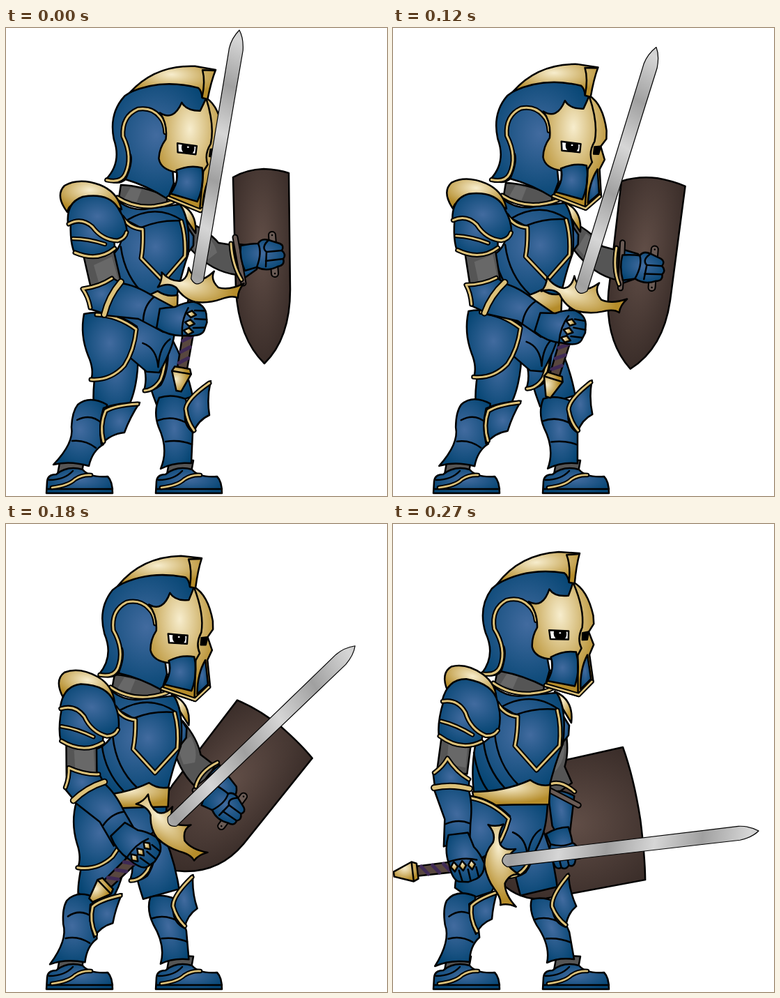
An HTML page that plays this animation: 547x671 px, repeating every 300 ms.

```html
<!DOCTYPE html>
<html lang="en">
<head>
<meta charset="utf-8">
<title>Knight lowering a sword</title>
<style>
html, body { margin: 0; width: 100%; height: 100%; overflow: hidden; background: #fff; }
svg { display: block; width: 100vw; height: 100vh; }
path { stroke: #000; stroke-width: 2.5; stroke-linejoin: round; stroke-linecap: round; vector-effect: non-scaling-stroke; }
.blue { fill: url(#blue); }
.gold { fill: url(#gold); }
.wood { fill: url(#wood); }
.steel { fill: url(#steel); stroke-width: 1.2; }
.gray { fill: #555; }
.grip { fill: #58473f; }
.white { fill: #fff; }
.black { fill: #000; }
.line { fill: none; }
.shade { fill: #686868; stroke: none; }
</style>
</head>
<body>
<svg id="stage" viewBox="0 0 547 671">
  <defs>
    <radialGradient id="blue" cx=".5" cy=".45" r=".6"><stop stop-color="#426b9f"/><stop offset="1" stop-color="#054573"/></radialGradient>
    <radialGradient id="gold" cx=".48" cy=".28" r=".62"><stop stop-color="#f7edcd"/><stop offset="1" stop-color="#b58c2a"/></radialGradient>
    <radialGradient id="wood" cx=".5" cy=".4" r=".6"><stop stop-color="#614e47"/><stop offset="1" stop-color="#3a2d29"/></radialGradient>
    <linearGradient id="steel" gradientUnits="userSpaceOnUse" x1="170" x2="235" y1="-8" y2="8" spreadMethod="reflect"><stop stop-color="#a0a0a0"/><stop offset="1" stop-color="#d6d6d6"/></linearGradient>
  </defs>
</svg>
<script>
const shape = (cls, d) => `<path class="${cls}" d="${d}"/>`;
const line = d => shape('line', d);
const stroke = (d, color, w) => `<path class="line" d="${d}" style="stroke:${color};stroke-width:${w}"/>`;
const band = (d, color, w) => stroke(d, '#000', w + 4) + stroke(d, color, w);
const trim = (d, w = 3) => band(d, '#dcc179', w);
const strap = (d, w) => band(d, '#6a5b55', w);
const diamond = x => shape('gold', `M${x - 5},0 l5,-7 5,7 -5,7z`);
const wrap = x => stroke(`M${x},-6 l9,12`, '#3f2a55', 5);

const foot = x => ({ art: `<g transform="translate(${x})">` +
  shape('gray', 'M78,618 L112,620 L108,642 L74,640Z') +
  shape('blue', 'M58,667 L59,650 Q60,640 72,640 Q88,627 110,633 Q120,645 146,643 Q153,650 153,667Z') +
  line('M59,661 L153,661') + line('M62,648 Q84,648 96,635') +
  trim('M66,659 Q90,656 99,647 Q110,640 122,641', 2.5) + '</g>' });

// A part swings between two poses, each given by an origin and one or two more landmarks.
// lag: follows the slower arm timing; bow: sideways bulge of its path;
// heldBy: hangs from another part's tip; drawn: landmarks of the artwork if not those of `from`.
const nearHip = { from: [150,415, 155,540], to: [132,400, 118,526] };

const forearm = { lag: true, from: [153,388, 264,423], to: [84,379, 100,490],
  art: shape('blue', 'M109,374 Q130,372 152,358 L166,366 L142,410 L121,403 Q119,385 109,374Z') +
    trim('M121,401 Q118,385 110,374 Q134,371 152,359') +
    shape('blue', 'M165,366 Q185,368 212,385 L240,400 Q228,415 226,436 L190,417 L142,412 Q150,385 165,366Z') +
    line('M212,386 Q198,398 197,419') +
    trim('M165,364 Q147,385 141,411', 6) };

const parts = [
  // shield and far arm
  { lag: true, bow: [4, -14], from: [326,214, 406,207, 371,480], to: [330,320, 363,510, 118,462],
    art: shape('wood', 'M326,214 Q345,203 370,202 Q392,203 406,208 L408,375 Q408,445 371,481 Q334,445 330,375Z') },
  { lag: true, from: [268,300, 322,335], to: [233,312, 233,377],
    art: shape('gray', 'M260,278 Q290,290 305,308 L330,312 L332,354 Q296,350 266,318Z') +
      shape('shade', 'M280,292 Q298,303 303,322 L290,332 L270,314Z') },
  { lag: true, bow: [11, -4], from: [323,310, 342,362, 360,330], to: [260,383, 220,383, 240,445],
    art: shape('blue', 'M326,309 L352,312 Q366,325 360,346 L343,358 Q331,340 326,309Z') +
      strap('M329,300 L341,366', 5) + trim('M323,309 Q325,340 338,361') },
  { lag: true, bow: [14, 6], from: [382,298, 386,351], to: [270,474, 222,484],
    art: strap('M382,297 L386,352', 8) + line('M382,297 h.1 M386,352 h.1') +
      shape('blue', 'M337,312 Q352,309 362,309 Q366,301 377,304 L393,309 Q400,312 396,319 Q403,325 398,331 Q401,340 390,342 Q375,350 360,343 L343,348 Q335,330 337,312Z') +
      line('M362,309 Q368,322 360,343') + line('M396,319 L374,321') + line('M398,331 L373,334') + line('M376,305 Q366,315 374,321 L373,342') },

  // far leg
  { from: [215,420, 245,530], to: [192,405, 212,520],
    art: shape('blue', 'M188,425 L235,440 Q258,480 268,528 L218,545 Q208,520 200,490Z') +
      shape('blue', 'M186,438 L232,440 Q236,490 222,512 Q210,522 198,520 Q204,500 196,480Z') +
      trim('M199,520 Q213,519 222,504 Q230,485 228,455') },
  foot(157),
  { from: [220,530, 222,632, 266,624], to: [199,538, 221,629, 260,624],
    art: shape('blue', 'M220,530 Q238,524 258,532 L268,580 L266,624 Q242,622 222,632 Q234,604 219,572 Q211,550 220,530Z') +
      line('M217,563 Q240,554 262,568') + line('M229,593 Q250,590 267,597') },
  { from: [294,506, 269,580], to: [252,501, 248,578],
    art: shape('blue', 'M257,552 Q258,530 294,506 Q288,530 292,555 Q276,562 269,580 Q255,570 257,552Z') +
      trim('M292,509 Q260,531 258,546 Q260,564 270,577') },

  // near leg
  foot(0),
  { ...nearHip, art: shape('blue', 'M130,480 Q124,520 126,540 L150,552 L178,538 Q194,500 188,436Z') },
  { from: [103,540, 68,625, 119,628], to: [77,540, 60,633, 110,628],
    art: shape('blue', 'M103,540 Q120,526 145,540 L140,597 Q124,606 119,628 Q92,620 68,626 Q98,595 94,572 Q95,550 103,540Z') +
      line('M102,562 Q122,552 138,567') + line('M95,592 Q114,590 129,602') },
  { from: [192,537, 137,597], to: [150,526, 119,588],
    art: shape('blue', 'M140,545 Q160,537 192,537 Q178,558 170,580 Q150,582 137,597 Q132,570 140,545Z') +
      trim('M189,539 Q156,541 143,549 Q134,570 140,593') },

  // torso
  { from: [170,274, 226,364], to: [153,260, 206,354], drawn: [153,260, 206,354],
    art: shape('gold', 'M232,240 Q260,252 256,285 L242,262Z') +
      shape('blue', 'M240,268 L253,289 L252,303 L240,318Z') +
      shape('blue', 'M114,396 L222,398 Q221,430 214,448 Q206,468 194,486 L176,484 L150,460 L110,440Z') +
      line('M172,442 Q192,450 193,478 Q196,448 212,438') +
      shape('blue', 'M146,234 Q165,250 190,246 L235,242 Q250,265 244,315 Q232,345 224,378 L116,386 Q112,350 118,318 Q150,310 150,270Z') +
      line('M116,328 Q122,364 136,382') + line('M130,312 Q134,350 160,378') + line('M146,300 Q150,345 180,374') +
      line('M156,262 Q200,238 238,266') +
      shape('blue', 'M153,260 Q165,272 178,273 Q205,263 236,266 Q242,290 240,318 L206,354 L174,318 Q180,295 177,274Z') +
      trim('M150,257 Q160,274 179,276 Q179,300 175,318 L206,353 L239,318 Q242,290 236,267') +
      shape('gold', 'M114,384 Q160,384 197,367 Q210,377 226,374 L224,402 Q170,402 118,404Z') +
      shape('gray', 'M150,210 Q180,212 217,230 L216,242 Q180,246 146,230Z') +
      shape('shade', 'M164,214 L180,218 L172,236 L154,230Z') +
      trim('M144,228 Q168,245 198,243 Q220,241 230,235') },
  { ...nearHip,
    art: shape('blue', 'M112,410 Q150,402 188,428 Q187,470 165,492 Q145,506 122,505 Q127,490 118,470 Q106,440 112,410Z') +
      trim('M122,504 Q150,506 170,484 Q184,462 187,432 Q160,412 130,411') },

  // head
  { from: [301,60, 279,265], to: [268,42, 267,248], drawn: [282,49, 268,256],
    art: shape('blue', 'M130,213 Q152,188 139,155 Q130,118 152,92 Q190,62 262,76 L270,92 L262,112 L220,150 L228,215 L220,238 Q190,220 158,212 Q148,222 130,213Z') +
      trim('M131,214 Q151,218 157,205 Q168,180 152,150 Q149,121 172,110 Q192,106 204,120 Q212,128 213,142') +
      line('M158,212 Q168,188 164,176') +
      shape('gold', 'M204,114 Q224,126 235,98 Q242,110 262,109 Q266,100 270,90 Q290,102 296,140 L296,152 L288,163 L294,182 L287,196 L290,234 L268,255 L220,238 L232,212 L232,199 Q208,196 205,180 Q205,165 214,152 Q216,130 204,114Z') +
      shape('blue', 'M231,196 Q250,187 268,191 Q273,215 263,240 L224,230 Q236,212 231,196Z') +
      shape('blue', 'M284,196 L287,231 L271,245 Q272,215 284,196Z') +
      line('M270,91 Q284,130 279,156 Q270,172 276,186 L270,196 L267,250') +
      shape('white', 'M231,157 L259,160 L258,172 L232,170Z') +
      shape('black', 'M239,159 L254,160 Q256,167 251,171 L242,170 Q237,166 239,159Z') +
      stroke('M246,162 l1,0', '#fff', 2) +
      shape('black', 'M279,164 L288,163 L285,174 L278,174Z') +
      trim('M221,236 L268,253 L288,235', 2.5) +
      shape('gold', 'M160,86 Q195,45 252,45 L282,49 Q276,66 272,92 L264,90 Q263,80 258,76 Q205,64 160,86Z') +
      line('M264,89 Q268,66 263,50 L281,50') },

  // near arm
  { from: [86,262, 166,258], to: [77,237, 149,252],
    art: shape('gold', 'M88,264 Q70,240 84,226 Q105,214 135,225 Q160,235 166,260 Q140,250 105,250 Q90,252 88,264Z') },
  { from: [132,326, 142,370], to: [90,304, 84,348],
    art: shape('gray', 'M108,312 L152,308 L167,372 L124,382Z') +
      shape('shade', 'M126,340 L152,328 L162,364 L134,368Z') },
  { from: [99,322, 156,316], to: [67,304, 127,312],
    art: shape('blue', 'M94,262 Q90,302 98,322 Q130,335 156,317 L154,270Z') +
      trim('M96,302 Q118,302 142,310', 2.5) + trim('M99,322 Q132,336 156,316') },
  { from: [89,282, 173,297], to: [70,255, 149,300],
    art: shape('blue', 'M89,281 Q86,250 110,242 Q150,235 163,262 Q172,275 174,293 Q172,306 160,306 Q135,302 124,286 Q108,272 89,281Z') +
      trim('M90,281 Q108,271 124,285 Q138,304 160,305 Q171,302 173,293') },
  forearm,

  // sword and hand, drawn along the x axis from the pommel
  { lag: true, heldBy: forearm, from: [264,423, 335,3], to: [100,490, 525,440], drawn: [99,0, 525,0],
    art: shape('grip', 'M32,-7 L136,-8 L136,8 L32,7Z') + [40, 56, 72, 116].map(wrap).join('') +
      shape('gold', 'M0,-3 L27,-14 L34,-11 L34,11 L27,14 L0,4Z') + line('M27,-13 L27,13') +
      shape('gold', 'M164,-52 Q152,-49 142,-54 Q152,-40 146,-28 Q132,-15 130,2 Q131,22 140,38 Q149,53 146,62 Q156,60 168,67 Q154,48 156,32 Q165,18 178,22 Q165,12 162,3 Q165,-8 177,-15 Q160,-14 156,-24 Q153,-38 164,-52Z') +
      shape('steel', 'M162,-9 Q150,0 162,9 L497,10 Q515,8 525,0 Q512,-9 497,-10Z') +
      shape('blue', 'M84,-46 Q75,-25 80,-4 Q82,20 92,22 L104,24 L116,21 Q129,16 130,0 Q126,-15 118,-25 Q114,-40 112,-46Z') +
      line('M93,6 L96,22 M106,6 L108,23 M118,4 L120,19 M80,-8 Q102,-13 120,-6') +
      [87, 99, 112].map(diamond).join('') }
];

const stage = document.getElementById('stage');
const mix = (a, b, f) => a + (b - a) * f;

// Origin and two axis vectors; without a third landmark the second axis is perpendicular.
function pose([x, y, bx, by, cx = x - (by - y), cy = y + (bx - x)]) {
  return { origin: [x, y], axes: [[bx - x, by - y], [cx - x, cy - y]] };
}

const matrix = ({ origin, axes }) => new DOMMatrix([...axes[0], ...axes[1], ...origin]);

// Turns one vector into another by angle and length.
function swing([ax, ay], [bx, by], f) {
  const turn = Math.atan2(ax * by - ay * bx, ax * bx + ay * by);
  const angle = Math.atan2(ay, ax) + turn * f;
  const length = mix(Math.hypot(ax, ay), Math.hypot(bx, by), f);
  return [length * Math.cos(angle), length * Math.sin(angle)];
}

const moving = parts.filter(part => part.from);
for (const part of parts) {
  part.node = document.createElementNS('http://www.w3.org/2000/svg', 'g');
  part.node.innerHTML = part.art;
  stage.append(part.node);
}
for (const part of moving) {
  part.start = pose(part.from);
  part.end = pose(part.to);
  part.inverse = matrix(pose(part.drawn || part.from)).inverse();
}

function place(part, progress) {
  const f = part.lag ? progress ** 1.4 : progress;
  const { start, end, bow = [0, 0] } = part;
  const origin = part.heldBy ? part.heldBy.tip
    : start.origin.map((v, i) => mix(v, end.origin[i], f) + 4 * f * (1 - f) * bow[i]);
  const axes = start.axes.map((axis, i) => swing(axis, end.axes[i], f));
  part.tip = origin.map((v, i) => v + axes[0][i]);
  const { a, b, c, d, e, f: ty } = matrix({ origin, axes }).multiply(part.inverse);
  part.node.setAttribute('transform', `matrix(${[a, b, c, d, e, ty].map(v => v.toFixed(5))})`);
}

const LOOP = 300, STEP = 30, REST = 60;
const begin = performance.now();
let shown = -1;

function tick() {
  const time = Math.floor((performance.now() - begin) % LOOP / STEP) * STEP;
  if (time !== shown) {
    shown = time;
    const u = Math.max(0, (time - REST) / (LOOP - STEP - REST));
    const progress = u * u * (3 - 2 * u);
    for (const part of moving) place(part, progress);
  }
  requestAnimationFrame(tick);
}
tick();
</script>
</body>
</html>
```
